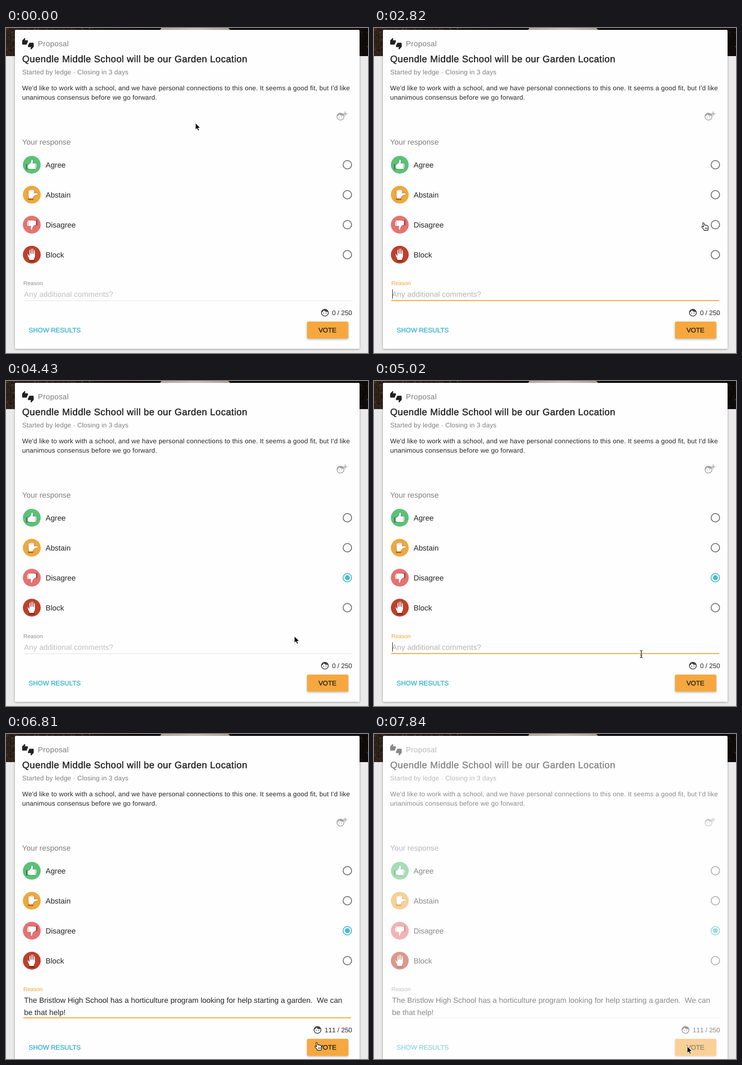
These frames come from a looping animation (772x694 px, 8 s). An HTML page:

```html
<!DOCTYPE html>
<html lang="en">
<head>
<meta charset="utf-8">
<title>Proposal vote</title>
<style>
  html, body { margin: 0; width: 100%; height: 100%; overflow: hidden; background: #eaeaea; }
  svg { display: block; }
  text { font-family: "Liberation Sans", Arial, sans-serif; font-size: 16px; fill: #262626;
         white-space: pre; text-rendering: geometricPrecision; }
  .s14 { font-size: 14px; }
  .muted { fill: #7f7f7f; }
  .medium { stroke-width: .5px; paint-order: stroke; }
  .title { font-size: 20px; fill: #212121; stroke: #212121; letter-spacing: .5px; }
  .body { letter-spacing: .22px; }
  .card { fill: #fefefe; filter: drop-shadow(0 1px 2px rgba(0, 0, 0, .35)); }
  .raised { filter: drop-shadow(0 2px 2px rgba(0, 0, 0, .28)); }
  .hand { fill: #fff; stroke-width: .8; stroke-linejoin: round; }
  #counter { font-kerning: none; }
</style>
</head>
<body>
<svg width="772" height="694" viewBox="0 0 772 694">
  <defs>
    <linearGradient id="soil">
      <stop offset="0" stop-color="#2c2119"/>
      <stop offset=".2" stop-color="#1d1611"/>
      <stop offset=".4" stop-color="#0d0b0a"/>
    </linearGradient>
    <linearGradient id="stone">
      <stop offset="0" stop-color="#b5aca2"/>
      <stop offset=".5" stop-color="#cfc5ba"/>
      <stop offset="1" stop-color="#b3a598"/>
    </linearGradient>
    <path id="face" d="M9 11.75a1.25 1.25 0 1 0 0 2.5 1.25 1.25 0 1 0 0-2.5zm6 0a1.25 1.25 0 1 0 0 2.5 1.25 1.25 0 1 0 0-2.5zM12 2C6.48 2 2 6.48 2 12s4.48 10 10 10 10-4.48 10-10S17.52 2 12 2zm0 18c-4.41 0-8-3.59-8-8 0-.29.02-.58.05-.86 2.36-1.05 4.23-2.98 5.21-5.37C11.07 8.33 14.05 10 17.42 10c.78 0 1.53-.09 2.25-.26.21.71.33 1.47.33 2.26 0 4.41-3.59 8-8 8z"/>
    <g id="thumb">
      <path d="M-9.5 0L-6-1.2Q-1.5-4-1.4-10Q0-12.8 2.4-10.5Q3.6-8 2.4-3.2H9Q11.2-2.6 10.6-.2Q11.8 1.4 10.6 3Q11.2 5 9.8 6.2Q10 9 7.4 9.6H-2L-9.5 8.4Z"/>
      <path d="M6-.2H10.4M6 3H10.4M6 6.2H9.6" fill="none" stroke-width=".7"/>
      <path d="M-11.8-1H-9.6V10H-11.8Z" fill="currentColor"/>
    </g>
    <g id="palm">
      <path d="M-5.5 12L-6 8Q-9.2 4-9.4-1Q-8.4-3-7.2-1L-5.6 2V-10Q-4.4-12-3.1-10L-2.7-2L-2.2-13Q-.9-15-.1-13L.4-2L.9-13.2Q2.2-15.2 3.2-12.8L3.5-1.6L4.3-9.8Q5.8-11.6 6.8-9.4L7.4 2Q7.4 6 5 9V12Z"/>
      <path d="M-6 12H5.8V14.4H-6Z" fill="currentColor"/>
    </g>
  </defs>

  <rect width="772" height="60" fill="url(#soil)"/>
  <g id="photo" opacity=".6"></g>
  <path d="M331 0H474L478 4H329Z" fill="url(#stone)"/>
  <rect id="card" class="card" x="19" y="4" width="735" height="681" rx="2"/>

  <g id="content">
    <path transform="translate(34.4 21.2) scale(1.03)" fill="#222" d="M12 6c0-.55-.45-1-1-1H5.82l.66-3.18.02-.23c0-.31-.13-.59-.33-.8L5.38 0 .44 4.94C.17 5.21 0 5.59 0 6v6.5c0 .83.67 1.5 1.5 1.5h6.75c.62 0 1.15-.38 1.38-.91l2.26-5.29c.07-.17.11-.36.11-.55V6zm10.5 4h-6.75c-.62 0-1.15.38-1.38.91l-2.26 5.29c-.07.17-.11.36-.11.55V18c0 .55.45 1 1 1h5.18l-.66 3.18-.02.24c0 .31.13.59.33.8l.79.78 4.94-4.94c.27-.27.44-.65.44-1.06v-6.5c0-.83-.67-1.5-1.5-1.5z"/>
    <text class="muted" x="68" y="39" letter-spacing=".35">Proposal</text>
    <text class="title medium" x="34.5" y="73">Quendle Middle School will be our Garden Location</text>
    <text class="s14 muted" x="34.5" y="99" letter-spacing=".16">Started by ledge · Closing in 3 days</text>
    <text class="s14 body" x="34.5" y="133">We'd like to work with a school, and we have personal connections to this one. It seems a good fit, but I'd like</text>
    <text class="s14 body" x="34.5" y="153">unanimous consensus before we go forward.</text>
    <g fill="#a3a3a3">
      <use href="#face" transform="translate(703.4 179.3) scale(.82)"/>
      <path d="M718.5 182.4H722.4V178.5H724V182.4H727.8V184H724V187.8H722.4V184H718.5Z"/>
    </g>
    <text class="muted" x="34.5" y="249" letter-spacing=".06">Your response</text>
    <g id="options"></g>

    <text id="label" x="37" y="549" style="font-size:12px">Reason</text>
    <text id="hint" x="38.5" y="574" letter-spacing=".1">Any additional comments?</text>
    <g id="comment">
      <text x="38.5" y="574" letter-spacing=".04">The Bristlow High School has a horticulture program looking for help starting a garden.  We can</text>
      <text x="38.5" y="600" letter-spacing=".04">be that help!</text>
    </g>
    <rect id="caret" width="1" height="20" fill="#111"/>
    <g id="footer">
      <rect id="line" x="37" width="699"/>
      <use id="counterFace" href="#face" fill="#444"/>
      <text id="counter" class="s14" x="738" y="613" text-anchor="end"></text>
      <text class="s14 medium" x="48.3" y="650" style="fill:#48b8d0;stroke:#48b8d0">SHOW RESULTS</text>
      <rect id="button" class="raised" x="642" y="627" width="88" height="36" rx="2.5"/>
      <text class="s14 medium" x="685.5" y="650" text-anchor="middle" style="fill:#30261a;stroke:#30261a">VOTE</text>
    </g>
  </g>

  <g id="mouse">
    <path id="arrow" d="M0 0V14.4L3.3 11.3 5.6 16.4 8 15.3 5.8 10.4H10.2Z" fill="#000" stroke="#fff"/>
    <g id="hand" stroke="#000" stroke-width="1.1" stroke-linejoin="round">
      <path fill="#fff" d="M-5.2-7.2Q-3.7-9.2-2.2-7.2L-1-2.8Q.2-4 1.6-2.7Q3-3.4 4.2-1.9Q6-2.2 6.6-.2L7.2 3Q7.4 5 6 8.4H-1.5Q-3 5.4-6 2.6Q-8 0-6.4-.6Q-5-.8-3.2 1Z"/>
      <path d="M.5 2V5.6M2.7 2V5.6M4.9 2V5.6" stroke-width=".9"/>
    </g>
    <path id="beam" d="M-3-7.5Q0-7.5 0-5.5Q0-7.5 3-7.5M0-5.5V5.5M-3 7.5Q0 7.5 0 5.5Q0 7.5 3 7.5M-2 2.5H2" fill="none" stroke="#111" stroke-width="1.2"/>
  </g>
</svg>
<script>
const LOOP = 8000;
const $ = id => document.getElementById(id);
const set = (el, attrs) => { for (const k in attrs) el.setAttribute(k, attrs[k]); };
const show = (el, on) => { el.style.display = on ? '' : 'none'; };
const within = (t, spans) => spans.some(([a, b]) => t >= a && t < b);

// Speckled ground in the visible edges of the cover photo
let seed = 7;
const rnd = () => (seed = (seed * 16807) % 2147483647) / 2147483647;
const tones = ['#3a2a1c', '#5a4330', '#241a12', '#6f5a45', '#1a1512'];
function speckle(n, x, w, h) {
  let out = '';
  for (let i = 0; i < n; i++) {
    out += `<rect x="${x + rnd() * w}" y="${rnd() * h}" width="${1 + rnd() * 2}" height="${1 + rnd() * 1.5}" fill="${tones[i % 5]}"/>`;
  }
  return out;
}
$('photo').innerHTML = speckle(120, 0, 17, 58) + speckle(80, 19, 170, 3) + speckle(16, 754, 16, 58);

// label, disc, outline, glyph, glyph transform
const options = [
  ['Agree', '#5ac277', '#3c7d52', 'thumb', ''],
  ['Abstain', '#eea93d', '#a8691c', 'thumb', 'translate(2 -1) scale(-1 1) rotate(-90)'],
  ['Disagree', '#e77272', '#a34848', 'thumb', 'rotate(180)'],
  ['Block', '#c13f2a', '#7d2418', 'palm', '']
];
$('options').innerHTML = options.map(([name, disc, dark, glyph, tf], i) => `
  <g transform="translate(0 ${292 + 64 * i})">
    <circle cx="55" r="19" fill="${disc}"/>
    <g transform="translate(55 0)"><g class="hand" transform="${tf}" stroke="${dark}" color="${dark}"><use href="#${glyph}"/></g></g>
    <text x="84.5" y="6">${name}</text>
    <circle class="ring" cx="728" r="9" fill="none" stroke="#757575" stroke-width="2"/>
    <circle class="dot" cx="728" r="0" fill="#4bbad5"/>
  </g>`).join('');
const ring = document.querySelectorAll('.ring')[2];
const dot = document.querySelectorAll('.dot')[2];

// time, x, y, pointer shape
const moves = [
  [0, 404, 203, 'arrow'], [150, 438, 318, 'hand'], [290, 492, 490, 'hand'], [440, 524, 567, 'beam'],
  [1490, 548, 500, 'hand'], [1630, 575, 420, 'hand'], [1780, 600, 352, 'hand'], [1930, 640, 385, 'hand'],
  [2070, 680, 417, 'hand'], [2370, 692, 420, 'hand'], [2670, 706, 424, 'hand'], [2960, 716, 426, 'hand'],
  [3250, 723, 425, 'hand'], [4140, 705, 450, 'hand'], [4290, 660, 500, 'hand'], [4430, 615, 545, 'arrow'],
  [4580, 585, 568, 'beam'], [4730, 570, 583, 'beam'], [6070, 640, 578, 'beam'], [6220, 690, 594, 'beam'],
  [6520, 684, 632, 'arrow'], [6670, 672, 655, 'hand'], [6810, 666, 667, 'hand'], [6960, 670, 674, 'hand'],
  [7550, 668, 667, 'arrow']
];
const focus = [[440, 3550], [4880, 7250]];
const blink = [[440, 740], [1340, 1930], [2520, 3110], [4880, 6220], [6820, 7250]];
const PICK = 3850, PASTE = 5620, PRESS = 7250, SENT = 7550;

function buttonColor(t) {
  if (t < PRESS) return '#f6a83f';
  if (t < 7700) return '#d88429';
  return t < 7840 ? '#e79634' : '#f6a83f';
}

function render(t) {
  const focused = within(t, focus), filled = t >= PASTE, picked = t >= PICK;
  const grow = filled ? 24 : 0;

  set($('card'), { height: 681 + grow });
  set($('footer'), { transform: `translate(0 ${grow})` });
  set($('line'), focused ? { y: 581, height: 2, fill: '#f3a83d' } : { y: 582, height: 1, fill: '#e0e0e0' });
  $('label').style.fill = focused ? '#f0a438' : '#909090';
  $('hint').style.fill = focused ? '#b4b4b4' : '#c0c0c0';
  show($('hint'), !filled);
  show($('comment'), filled);
  show($('caret'), within(t, blink));
  set($('caret'), filled ? { x: 137, y: 584 } : { x: 39, y: 558 });
  $('counter').textContent = (filled ? 111 : 0) + ' / 250';
  set($('counterFace'), { transform: `translate(${filled ? 654.4 : 670.2} 598) scale(.82)` });

  set(ring, { stroke: picked ? '#4bbad5' : '#757575' });
  set(dot, { r: picked ? 5.4 : 0 });

  set($('button'), { fill: buttonColor(t) });
  set($('content'), { opacity: t >= SENT ? .54 : 1 });

  const [, x, y, shape] = moves.filter(m => m[0] <= t).pop();
  set($('mouse'), { transform: `translate(${x} ${y})` });
  for (const id of ['arrow', 'hand', 'beam']) show($(id), id === shape);
}

const start = performance.now();
function tick() {
  render((performance.now() - start) % LOOP);
  requestAnimationFrame(tick);
}
tick();
</script>
</body>
</html>
```
